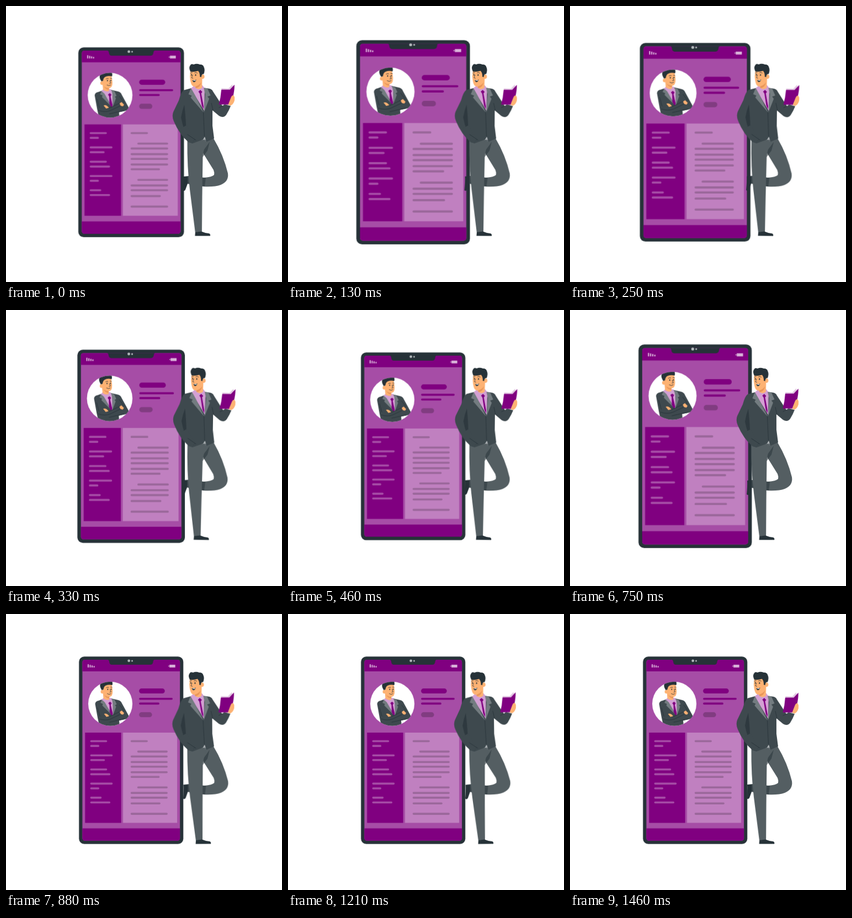
An HTML page without scripts that plays this animation: 500x500 px, repeating every 1500 ms.

```html
<!DOCTYPE html>
<html lang="en">
<head>
<meta charset="utf-8">
<title>Profile on a phone</title>
<style>
  html, body { margin: 0; height: 100%; overflow: hidden; background: #fff; }
  svg { display: block; width: 100%; height: 100%; }

  .dark { fill: #263238; }
  .purple { fill: #800080; }
  .mid { fill: #a64da6; }
  .pale { fill: #c080c0; }
  .glyph { fill: #d9b3d9; }
  .lens { fill: #b4babd; }
  .suit { fill: #3e494e; }
  .fold { fill: #2e393f; }
  .lapel { fill: #737c80; }
  .cloth { fill: #545e62; }
  .shirt { fill: #d3a0d3; }
  .skin { fill: #fdb273; }
  .shade { fill: #e8965a; }
  .lines { fill: none; stroke-linecap: round; stroke-width: 3.6; }
  .ink { fill: none; stroke: #263238; stroke-width: .8; stroke-linecap: round; stroke-linejoin: round; }

  /* Both loops run at 24 drawings per second */
  .phone, .man { animation: beat 1.5s -4ms infinite; }
  .phone { transform-origin: 226.7px 247px; }
  .man { transform-origin: 357.5px 260.5px; animation-name: sway; }

  @keyframes beat {
    0% { transform: scale(1.0135); animation-timing-function: steps(4, jump-none); }
    11.1111% { transform: scale(1.09); animation-timing-function: steps(7, jump-none); }
    30.5556% { transform: scale(1.002); }
    38.8889% { transform: scale(1.002); animation-timing-function: steps(4, jump-none); }
    50% { transform: scale(1.087); animation-timing-function: steps(4, jump-none); }
    61.1111%, 100% { transform: scale(1.001); }
  }
  @keyframes sway {
    0% { transform: rotate(.056deg); animation-timing-function: steps(9, jump-none); }
    25% { transform: rotate(.944deg); animation-timing-function: steps(18, jump-none); }
    75% { transform: rotate(-.944deg); animation-timing-function: steps(9, jump-none); }
    100% { transform: rotate(-.056deg); }
  }
</style>
</head>
<body>
<svg viewBox="0 0 500 500">
  <defs>
    <clipPath id="screen"><rect x="138.4" y="83" width="176.6" height="327.4" rx="4.5"/></clipPath>
    <clipPath id="disc"><circle cx="189" cy="162.7" r="40"/></clipPath>
  </defs>

  <g class="phone">
    <rect class="dark" x="132.3" y="77.3" width="188.8" height="339.2" rx="9.5"/>
    <g clip-path="url(#screen)">
      <path class="mid" d="M138 83H316V411H138Z"/>
      <path class="purple" d="M138 83H316V104H138ZM138 388.3H316V411H138Z"/>
      <path class="dark" d="M183 82.5Q187 83 187 86.500Q187.500 92 192 92H261Q266 92 266.500 86.500Q266.500 83 270 82.500Z"/>
    </g>
    <circle class="lens" cx="222.6" cy="84.8" r="2.4"/>
    <circle class="lens" cx="228.4" cy="84.9" r="1.5"/>
    <path class="glyph" d="M148 91.200h2v5.800h-2ZM151.500 92.200h2v4.800h-2ZM155 93.200h2v3.800h-2ZM158.500 94.200h2v2.800h-2ZM296 92h10.500v5H296ZM294 93.500h1.300v2H294Z"/>

    <rect class="purple" x="241" y="135" width="46.600" height="9" rx="4.500"/>
    <path class="lines" stroke="#800080" d="M242.800 153.700H300M242.800 162.300H276"/>
    <rect x="241" y="178" width="23.500" height="9" rx="4.500" opacity=".22"/>

    <path class="purple" d="M143.300 214.800H208.600V378.200H143.300Z"/>
    <path class="pale" d="M212 214.800H310V378.200H212Z"/>
    <path class="lines" stroke="#a64da6" d="M154.300 230.400H181.500M154.300 239H167.300M154.300 256H191.500M154.300 264.600H177.500M154.300 281.600H181.500M154.300 290.200H187.300M154.300 307.100H191.500M154.300 315.700H167.300M154.300 332.600H171.500M154.300 341.200H187.300"/>
    <path class="lines" stroke="#000" opacity=".2" d="M227.500 230.400H255M239.500 249.200H291M227.500 258H291M227.500 268H291M227.500 276.600H291M227.500 286.500H291M227.500 295.100H276.500M239.500 314H291M227.500 324H291M227.500 332.600H291M227.500 343H278M227.500 361.800H291"/>

    <circle cx="189" cy="162.700" r="40" fill="#fff"/>
    <g clip-path="url(#disc)">
      <path class="suit" d="M161.500 163Q162 158 168 157L176 154L190 153L203 156Q208 157 210 162L222 184Q222.500 189 215 191L205 193L206 206H170L166 188Z"/>
      <path class="shirt" d="M173 156L177 151.500L190 152L193.500 158L194 185L181 168Z"/>
      <path class="lapel" d="M174 155.500L171 161L175.500 163L174.500 166L193 184.500L179 160ZM191.500 153.500L194 164L193.500 184.500L199.500 168L197.500 165.500L200.500 163.500L197 156Z"/>
      <path class="purple" d="M185.300 161.500L188.500 159L191.500 161.500L189.800 165L193.500 181L191.800 185L187.800 178L187.500 165Z"/>
      <path class="skin" d="M175.500 142L176.500 153Q182 157.500 187 155L188 146Z"/>
      <path class="shade" d="M178 146Q182 150 187 150L186.800 153Q180 152 178 146Z"/>
      <path class="skin" d="M174 130L191 127Q193 133 193.200 140Q193.500 150 187 150.200Q180 150 176.500 144.500Z"/>
      <circle class="skin" cx="174.800" cy="141" r="3.300"/>
      <path class="dark" d="M173.500 138Q169 131 171 127Q170 122 176 122Q182 119 188 120.500Q191 118 191 121Q194 124 192.500 129Q185 127 180 130Q177 132 176.500 137Z"/>
      <path class="ink" d="M182 133.500Q184 132 186 133M189.500 132.500L192 132.500M188.500 137L190.500 141L188 141.500M183.500 144.500Q187 147 190 144.500"/>
      <path class="dark" d="M183.500 135.500h1.600v2.200h-1.600ZM189.700 135.200h1.500v2.200h-1.500Z"/>
      <path class="suit" d="M181 184L191 184L209 176L216 177L222 185Q222 190 214 191L184 198L170 198L167 188Z"/>
      <path class="ink" d="M169 190Q180 194 190 190L209 181M187 186L206 177M188 196L214 190M206 165L214 176M166 170L170 185"/>
      <path class="skin" d="M177.500 181Q181 179.500 184 182L187 185L182 186.500ZM206 177.500L209.500 175L214 179.500L212 182.500L208 181.500Z"/>
    </g>
  </g>

  <g class="man">
    <path class="dark" d="M332 308L321 309Q321.500 320 320 334Q323 336.500 325 333L329 322L334 322Z"/>
    <path class="cloth" d="M350 247L376 240Q394 270 402 303Q404 318 389 324Q378 328 358 327L329 322V309L359 311Q373 310 377 306Q378 302 376 297L358 268Z"/>
    <path class="fold" opacity=".6" d="M329 309L362 311L360 327L329 322ZM369 246L356 264V274L365 262Z"/>
    <path class="cloth" d="M328.500 243Q328 292 333 332L343 411L355 410.500L355.500 345L356.500 270L363 242Z"/>
    <path class="dark" d="M343 410L354 408.500Q361 411.500 368 412Q371 413.500 370 416.500H342.500Z"/>

    <path class="skin" d="M405 165L410 161Q415 163 414 169Q413 177 407 180.500L401 178Z"/>
    <path class="suit" d="M335 149L322 152.500Q317 156 313 171L303 192Q300 200 304 209Q314 233 331 247L338 249L357 242L360 237L363 246L377 240L374 217V189L386 199Q394 204 399 197Q404 189 407 181L396 178L392 181L375 155Q373 150 367 149.500L357 148Z"/>
    <path class="fold" d="M323 179Q325 195 326 216L328 225L342 242L337 248L331 246Q321 222 317 202Q319 190 323 179Z"/>
    <path class="suit" d="M327 216Q335 231 343 240L337 248.500L330 246Q321 237 316 222Z"/>
    <path class="ink" stroke-width=".7" d="M357.500 192L359.500 237M375 189L372 176M392 181L386 184M329 233L344 243"/>
    <path class="lapel" opacity=".6" d="M357 242L359.500 236L363 246Z"/>

    <path class="shirt" d="M335 149L341 144L355 143L360 149L359 190L344 165Z"/>
    <path class="lapel" d="M335 149L330.500 160L336.500 162.500L334.500 166L358 193L342 161ZM358 148.500L361 160L358.500 193L368 168L365 164L370.500 162L365 149.500Z"/>
    <path class="purple" d="M348.500 155L352 152L355.500 155.500L353.500 158.500L358 182L357.500 187L354.500 180L351 159Z"/>

    <path class="skin" d="M341 138L342.500 147Q348 154 355 148L355.500 127Z"/>
    <path class="shade" d="M343 145.500Q350 144 353.500 138Q352 148 343.500 149Z"/>
    <path class="skin" d="M334 116L353 114L354.500 132Q351 142 343 146Q337 146.500 335 140Q333.500 135 333 128Z"/>
    <circle class="skin" cx="355.500" cy="128" r="4"/>
    <path class="dark" d="M334 119Q330 111 334 107Q335 104 340 106Q345 103.500 351 106Q357 105.500 358.500 111Q361 116 358 123.500Q354.500 122 353.500 129L351 128Q352 122 348 117.500Q341 120 334 119Z"/>
    <path class="ink" d="M334 121.500L337 120.800M341.500 121Q344 119.500 346.500 121.500M338 125L336 130L338.500 131"/>
    <path class="dark" d="M335 123.500h1.600v2.600h-1.600ZM342.500 123.800h1.800v2.600h-1.800ZM337.500 134Q341 135 344.500 133Q343.500 138.500 340 138Q338 137 337.500 134Z"/>
    <path fill="#fff" d="M338.500 134.400Q341 135 343.700 133.800L343 135.500H339Z"/>

    <path fill="#e3cae3" d="M390 149L403 149.500Q406 146 410 142L411 146L406 155L391 153Z"/>
    <path class="purple" d="M390 151.500L405.500 151.500L413.800 142.500Q414 153 411 165L405 178.500L385.500 178.500Q389 166 390 151.500Z"/>
    <path class="skin" d="M407 167Q409 161 412.500 162Q414.500 165 414 170Q412.500 177 408 179.500L402.500 178.500Z"/>
  </g>
</svg>
</body>
</html>
```
